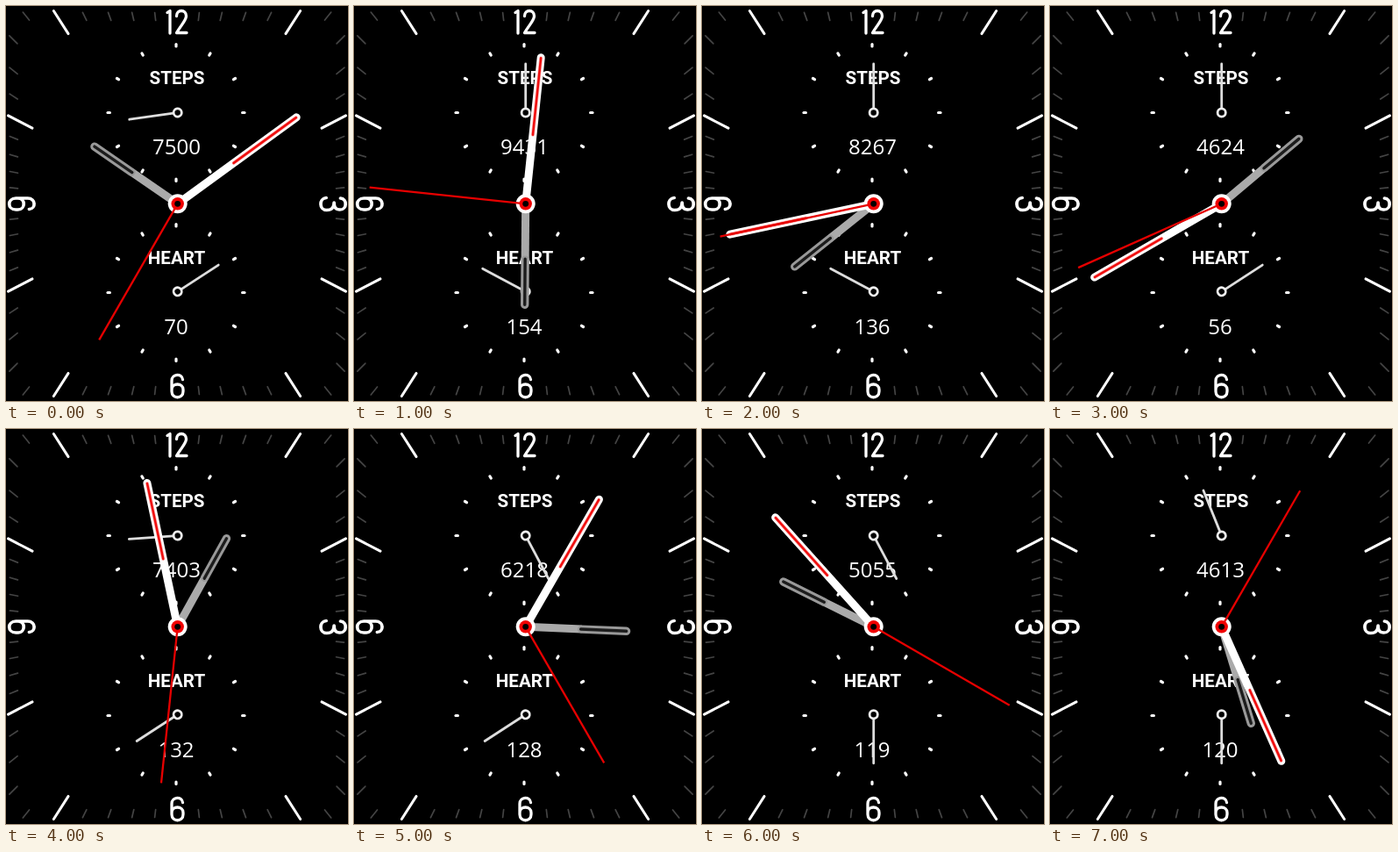
Animation of 390x450 px, one loop 8 s. Source, as an HTML page:

```html
<!DOCTYPE html>
<html lang="en">
<head>
<meta charset="utf-8">
<title>Watch face</title>
<style>
  html, body { margin: 0; width: 100%; height: 100%; overflow: hidden; background: #000; }
  svg { display: block; width: 390px; height: 450px; }
  text { fill: #fff; text-anchor: middle; }
  .label { font: 600 20.6px Roboto, sans-serif; }
  .value { font: 400 24px "Open Sans", "Noto Sans", sans-serif; }
  .line { fill: none; stroke-linecap: round; stroke-linejoin: round; }
</style>
</head>
<body>
<svg viewBox="0 0 390 450">
  <g id="dial" class="line"></g>
  <g class="line" stroke="#fff" stroke-width="3.3">
    <path transform="translate(195 18)" d="M-11 -10.5L-8 -12.5V13M-.5 -6.5C-.5 -14.5 10.5 -14.5 10.5 -6.5C10.5 -2 6 2 -.5 12.5H11"/>
    <path transform="translate(373 225.5) rotate(90) scale(1 1.12)" d="M-6.5 -7.5C-6 -14.5 6.5 -14.5 6.5 -7C6.5 -2.5 4 -1 -1.5 -1C4 -1 7 1.5 7 6.5C7 14.5 -6.5 14.5 -7 7"/>
    <path class="six" transform="translate(195.5 433)"/>
    <path class="six" transform="translate(18 225.5) rotate(90) scale(1 1.12)"/>
  </g>
  <text class="label" x="195" y="89">STEPS</text>
  <text class="label" x="194.5" y="293.5">HEART</text>
  <text class="value" id="steps" x="194.5" y="169"></text>
  <text class="value" id="heart" x="194" y="374"></text>
  <g id="stepsHand" class="line"></g>
  <g id="heartHand" class="line"></g>
  <g id="hour" class="line">
    <path d="M0 0V-64" stroke="#aaa" stroke-width="9" stroke-linecap="butt"/>
    <path d="M0 -64V-115" stroke="#999" stroke-width="9.4"/>
    <path d="M0 -63V-115" stroke="#1c1c1c" stroke-width="3.4"/>
  </g>
  <g id="minute" class="line">
    <path d="M0 0V-167.5" stroke="#fff" stroke-width="9"/>
    <path d="M0 -79V-167" stroke="#fbb" stroke-width="4"/>
    <path d="M0 -79V-167" stroke="#f01010" stroke-width="2.6"/>
  </g>
  <circle cx="195.7" cy="225.3" r="11" fill="#fff"/>
  <path id="second" d="M0 0V-179" stroke="#e60000" stroke-width="2.3"/>
  <circle cx="195.7" cy="225.3" r="7.2" fill="#f00000"/>
  <circle cx="195.7" cy="225.3" r="3.4" fill="#000"/>
</svg>
<script>
const STEP = 1000;
const CX = 195.7, CY = 225.3;
// hour, minute, second, steps, steps angle, heart rate, heart angle
const STATES = [
  [10, 9, 35, 7500, 262, 70, 57],
  [6, 1, 46, 9431, 0, 154, 298],
  [7, 43, 43, 8267, 0, 136, 298],
  [1, 40, 41, 4624, 0, 56, 57],
  [12, 58, 31, 7403, 266, 132, 237],
  [3, 5, 25, 6218, 152, 128, 237],
  [9, 53, 20, 5055, 152, 119, 180],
  [5, 26, 5, 4613, 338, 120, 180]
];
const $ = id => document.getElementById(id);
const rad = deg => deg * Math.PI / 180;
const dial = $('dial');

function tick(cx, cy, dx, dy, outer, inner, color, width) {
  const p = document.createElementNS('http://www.w3.org/2000/svg', 'path');
  const at = r => `${(cx + dx * r).toFixed(2)} ${(cy + dy * r).toFixed(2)}`;
  p.setAttribute('d', `M${at(outer)}L${at(inner)}`);
  p.setAttribute('stroke', color);
  p.setAttribute('stroke-width', width);
  dial.append(p);
}

// Minute ticks run along the rectangular edge, slightly spread sideways.
for (let i = 0; i < 60; i++) {
  if (i % 15 === 0) continue;
  const x = 1.11 * Math.sin(rad(i * 6)), y = -Math.cos(rad(i * 6));
  const len = Math.hypot(x, y), dx = x / len, dy = y / len;
  const edge = Math.min(192.5 / Math.abs(dx), 219.5 / Math.abs(dy));
  const depth = 9 / Math.max(Math.abs(dx), Math.abs(dy));
  if (i % 5) tick(195, 225, dx, dy, edge - 2, edge - 2 - depth, '#444', 1.7);
  else tick(195, 225, dx, dy, edge, edge - 31, '#fff', 3);
}

for (const cy of [121.5, 326.5])
  for (let a = 0; a < 360; a += 30)
    tick(194, cy, Math.sin(rad(a)), -Math.cos(rad(a)), 78, 75.6, '#fff', 3.2);

for (const six of document.querySelectorAll('.six'))
  six.setAttribute('d', 'M6 -7.5C5.5 -14.5 -6.5 -14.5 -6.5 -6V6C-6.5 15 6.5 15 6.5 6V4C6.5 -4 -6.5 -4 -6.5 4');

for (const id of ['stepsHand', 'heartHand'])
  $(id).innerHTML =
    '<path d="M0 -5V-55.5" stroke="#ddd" stroke-width="2.8"/>' +
    '<circle r="4.6" fill="#000" stroke="#eee" stroke-width="2.8"/>';

function turn(id, y, deg) {
  $(id).setAttribute('transform', `translate(${CX} ${y}) rotate(${deg})`);
}

let shown = -1;
function draw(now) {
  const i = Math.floor(now / STEP) % STATES.length;
  if (i === shown) return;
  shown = i;
  const [h, m, s, steps, stepsDeg, bpm, bpmDeg] = STATES[i];
  turn('hour', CY, h * 30 + m / 2);
  turn('minute', CY, m * 6);
  turn('second', CY, s * 6);
  turn('stepsHand', 121.5, stepsDeg);
  turn('heartHand', 325.3, bpmDeg);
  $('steps').textContent = steps;
  $('heart').textContent = bpm;
}

const start = performance.now();
function loop() {
  draw(performance.now() - start);
  requestAnimationFrame(loop);
}
loop();
</script>
</body>
</html>
```
